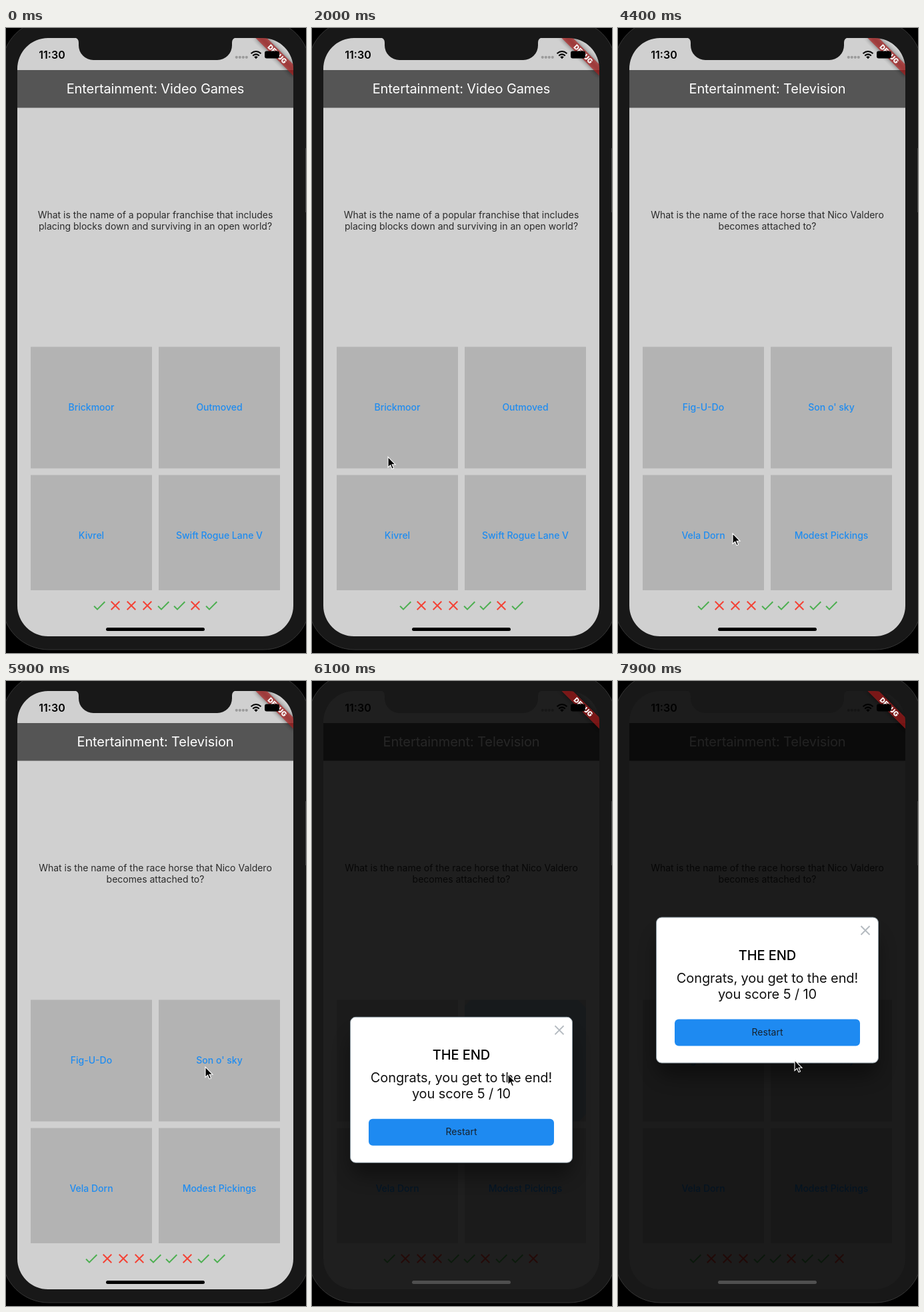
Write an HTML page that moves like this. It is 450x936 px and loops after 8 s.

```html
<!DOCTYPE html>
<html lang="en">
<head>
<meta charset="utf-8">
<title>Quiz app</title>
<style>
  html, body { margin: 0; width: 100%; height: 100%; overflow: hidden; background: #000; }
  svg { display: block; width: 450px; height: 936px; }
  text { font: 14px Inter, Roboto, sans-serif; text-anchor: middle; fill: #2b2b2b; }
  .big { font-size: 20px; letter-spacing: -.1px; }
  .answer { font-weight: 500; fill: #1f8cf0; }
  .clock { font-size: 16px; font-weight: 600; fill: #000; }
  .debug { font-size: 10.2px; font-weight: 900; fill: #fff; }
  .line { fill: none; stroke-width: 2; }
</style>
</head>
<body>
<svg viewBox="0 0 450 936">
  <defs>
    <clipPath id="tileClip"><rect id="tileBox" y="477.5" width="182" height="182"/></clipPath>
    <filter id="soft" x="-50%" y="-50%" width="200%" height="200%"><feGaussianBlur stdDeviation="3.5"/></filter>
    <filter id="wide" x="-50%" y="-50%" width="200%" height="200%"><feGaussianBlur stdDeviation="14"/></filter>
  </defs>

  <rect x="17" y="15" width="414" height="896" fill="#d0d0d0"/>
  <rect x="17" y="63" width="414" height="56.5" fill="#555"/>
  <text id="title" class="big" x="224" y="98" style="fill:#fff"></text>
  <text id="q0" x="224" y="285"></text>
  <text id="q1" x="224" y="302"></text>
  <g fill="#b3b3b3">
    <rect x="37" y="477.5" width="182" height="182"/>
    <rect x="229" y="477.5" width="182" height="182"/>
    <rect x="37" y="669.5" width="182" height="172.5"/>
    <rect x="229" y="669.5" width="182" height="172.5"/>
  </g>
  <g clip-path="url(#tileClip)"><circle id="ripple" fill="#2196f3"/></g>
  <text id="a0" class="answer" x="128" y="573"></text>
  <text id="a1" class="answer" x="320" y="573"></text>
  <text id="a2" class="answer" x="128" y="765"></text>
  <text id="a3" class="answer" x="320" y="765"></text>
  <g id="marks" class="line"></g>
  <rect id="scrim" x="17" y="15" width="414" height="896"/>

  <g id="dialog">
    <rect x="58" y="380" width="332" height="212" rx="20" opacity=".4" filter="url(#wide)"/>
    <rect x="57.5" y="354" width="333" height="218" rx="8" fill="#fff" stroke="#8c9aa3"/>
    <path class="line" stroke="#b4bac0" d="M364.5 367l13 13m0-13l-13 13"/>
    <text class="big" x="224" y="418" style="font-weight:500;fill:#000">THE END</text>
    <text class="big" x="224" y="452" style="fill:#111">Congrats, you get to the end!</text>
    <text class="big" x="224" y="476" style="fill:#111">you score 5 / 10</text>
    <rect x="85" y="506.5" width="278" height="40" rx="6" fill="#1e8af1"/>
    <text x="224" y="531" style="fill:#16222e">Restart</text>
  </g>

  <g transform="translate(431 15) rotate(45)">
    <rect x="-40" y="28" width="80" height="12" opacity=".5" filter="url(#soft)"/>
    <rect x="-40" y="28" width="80" height="12" fill="#b71c1c" fill-opacity=".627"/>
    <text class="debug" y="37.7">DEBUG</text>
  </g>
  <text class="clock" x="69" y="45.8">11:30</text>
  <g opacity=".25">
    <circle cx="345.8" cy="43.8" r="2.1"/><circle cx="350.8" cy="43.8" r="2.1"/>
    <circle cx="355.8" cy="43.8" r="2.1"/><circle cx="360.8" cy="43.8" r="2.1"/>
  </g>
  <path class="line" stroke="#000" d="M367.5 38.2q7.5-6.4 15 0M370.2 41.4q4.8-4 9.6 0"/>
  <path d="M372.2 43.3q2.8-2.1 5.6 0l-2.8 2.9z"/>
  <rect x="388" y="34.5" width="22" height="11" rx="3"/>
  <rect id="home" x="150" y="898" width="148" height="5" rx="2.5"/>

  <!-- The phone body covers the screen's corners and everything outside it. -->
  <path id="body" fill="#181818" fill-rule="evenodd" stroke="none"/>
  <rect x="-6" y="-12" width="462" height="943" rx="70" fill="none" stroke="#363636"/>
  <rect x="449" y="180" width="1" height="96" fill="#444"/>
  <path fill="#181818" d="M102 14Q109 15 109 22V26A22 22 0 0 0 131 48H317A22 22 0 0 0 339 26V22Q339 15 346 14Z"/>
  <path id="cursor" stroke="#fff" stroke-width="1.1" d="M0 0V15.5L3.6 12.2 6 17.8 8.5 16.7 6.1 11.3H11Z"/>
</svg>
<script>
const $ = id => document.getElementById(id);
const pages = [
  { title: 'Entertainment: Video Games',
    lines: ['What is the name of a popular franchise that includes',
            'placing blocks down and surviving in an open world?'],
    answers: ['Brickmoor', 'Outmoved', 'Kivrel', 'Swift Rogue Lane V'] },
  { title: 'Entertainment: Television',
    lines: ['What is the name of the race horse that Nico Valdero',
            'becomes attached to?'],
    answers: ['Fig-U-Do', "Son o' sky", 'Vela Dorn', 'Modest Pickings'] }
];
const results = '1000110110';
const LOOP = 8000, SPLASH = 265, FADE = 375, OPEN = 216;
const taps = [
  { at: 2214, x: 127, y: 612, cx: 128 },
  { at: 5920, x: 299, y: 578, cx: 320 }
];
// Pointer stops: time, x, y
const stops = [
  [1100, 80, 724], [1200, 80, 724], [1399, 2, 905], [2150, 127, 612],
  [3600, 127, 612], [3800, 133, 632], [4000, 133, 632], [4400, 172, 757],
  [4800, 182, 742], [5300, 182, 742], [5850, 299, 578], [6000, 299, 578],
  [6100, 294, 589], [6200, 294, 589], [7000, 265, 568], [LOOP, 265, 568]
];

const clamp = v => Math.max(0, Math.min(1, v));
const mix = (a, b, p) => a + (b - a) * p;

// cubic-bezier(.25, .1, .25, 1)
function ease(p) {
  const curve = (a, b, s) => 3 * a * s * (1 - s) ** 2 + 3 * b * s * s * (1 - s) + s ** 3;
  let lo = 0, hi = 1;
  for (let i = 0; i < 20; i++) {
    const mid = (lo + hi) / 2;
    if (curve(.25, .25, mid) < p) lo = mid; else hi = mid;
  }
  return curve(.1, 1, hi);
}

function set(id, attrs) {
  for (const key in attrs) $(id).setAttribute(key, attrs[key]);
}

function roundRect(x, y, w, h, r) {
  const arc = (dx, dy) => `a${r} ${r} 0 0 1 ${dx} ${dy}`;
  return `M${x + r} ${y}h${w - 2 * r}${arc(r, r)}v${h - 2 * r}${arc(-r, r)}` +
    `h${2 * r - w}${arc(-r, -r)}v${2 * r - h}${arc(r, -r)}z`;
}

function drawPage(page, count) {
  $('title').textContent = page.title;
  page.lines.forEach((s, i) => $('q' + i).textContent = s);
  page.answers.forEach((s, i) => $('a' + i).textContent = s);
  $('marks').innerHTML = [...results.slice(0, count)].map((r, i) => {
    const x = 212 + (i - (count - 1) / 2) * 24;
    const [color, d] = r === '1'
      ? ['#4caf50', 'M4.1 12.7L9 17.6 20.3 6.3']
      : ['#f44336', 'M5.7 5.7L18.3 18.3M18.3 5.7L5.7 18.3'];
    return `<path transform="translate(${x} 853)" stroke="${color}" d="${d}"/>`;
  }).join('');
}

function drawRipple(t) {
  const tap = taps[t < taps[1].at ? 0 : 1];
  const age = t - tap.at;
  const p = ease(clamp(age / SPLASH));
  const alpha = age < 0 ? 0 : .14 * (1 - clamp((age - SPLASH) / FADE));
  set('tileBox', { x: tap.cx - 91 });
  set('ripple', { cx: mix(tap.x, tap.cx, p), cy: mix(tap.y, 568.5, p), r: mix(38, 128, p), opacity: alpha });
}

function drawDialog(t) {
  const p = clamp((t - taps[1].at) / OPEN);
  const dim = ease(p);
  const grey = Math.round(80 * dim);
  set('scrim', { opacity: .867 * dim });
  set('dialog', { transform: `translate(0 ${896 * (1 - p)})`, visibility: p ? 'visible' : 'hidden' });
  set('home', { fill: `rgb(${grey},${grey},${grey})` });
}

function drawCursor(t) {
  const shown = t >= 1400 || (t >= 1100 && t < 1200);
  set('cursor', { visibility: shown ? 'visible' : 'hidden' });
  if (!shown) return;
  const i = stops.findIndex(s => s[0] > t);
  const [t0, x0, y0] = stops[i - 1], [t1, x1, y1] = stops[i];
  const p = (t - t0) / (t1 - t0), s = p * p * (3 - 2 * p);
  set('cursor', { transform: `translate(${mix(x0, x1, s)} ${mix(y0, y1, s)})` });
}

let state = -1;
function frame() {
  const t = Math.floor(performance.now() % LOOP / 100) * 100;
  const answered = taps.filter(tap => t >= tap.at).length;
  if (answered !== state) {
    state = answered;
    drawPage(pages[Math.min(answered, 1)], 8 + answered);
  }
  drawRipple(t);
  drawDialog(t);
  drawCursor(t);
  requestAnimationFrame(frame);
}
set('body', { d: roundRect(-6, -12, 462, 943, 70) + roundRect(17, 15, 414, 896, 46) });
frame();
</script>
</body>
</html>
```
